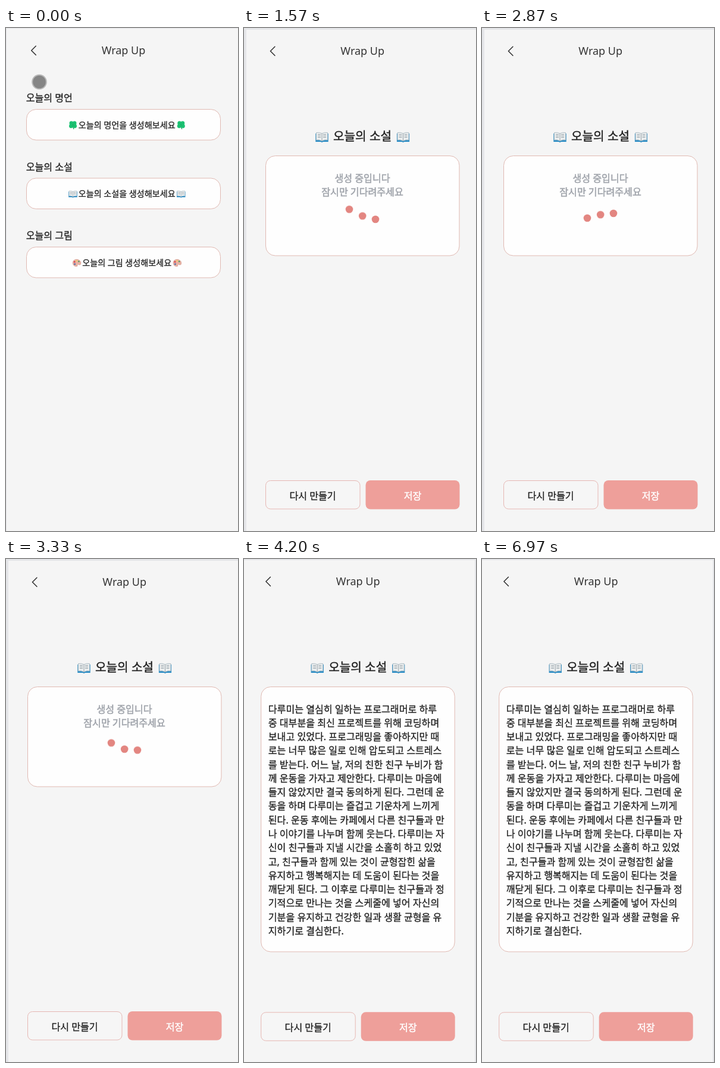
Write an HTML page that moves like this. It is 390x844 px and loops after 7010 ms.

```html
<!DOCTYPE html>
<html lang="ko">
<head>
<meta charset="utf-8">
<title>Wrap Up</title>
<style>
html, body { margin: 0; width: 100%; height: 100%; overflow: hidden; background: #f5f5f5; }
svg { display: block; }
text { font-family: "Noto Sans", "Noto Sans CJK KR", "Noto Sans CJK", sans-serif; font-size: 16.1px; fill: #222; stroke: #222; stroke-width: .3px; white-space: pre; }
.title { font-size: 18px; fill: #333; stroke: none; }
.head { font-size: 20.2px; stroke-width: .45px; }
.cta { font-size: 14.1px; }
.mid { text-anchor: middle; }
.wait { fill: #a2a6ad; stroke: #a2a6ad; stroke-width: .6px; }
.white { fill: #fff; stroke: #fff; stroke-width: .5px; }
.card { fill: #fefefe; stroke: #e0b9b2; }
.ghost { fill: #f6f6f6; stroke: #e6b7b3; }
.solid { fill: #ee9f9a; }
.back { fill: none; stroke: #333; stroke-width: 1.6; stroke-linecap: round; stroke-linejoin: round; }
.dot { fill: #e38681; }
</style>
</head>
<body>
<svg id="stage" width="390" height="844" viewBox="0 0 390 844">
  <defs>
    <symbol id="book" viewBox="0 0 22 20">
      <path d="M.3 4H21.700V18H13L11 19L9 18H.3Z" fill="#2f8fc6"/>
      <path d="M1.500 2.500Q7 1.500 11 4Q15 1.500 20.500 2.500V15Q15 14 11 16.500Q7 14 1.500 15Z" fill="#eceff0" stroke="#a3b3bc" stroke-width=".8"/>
      <path d="M11 4V16.500M4 5.500H9M4 8H9M4 10.500H9M13 5.500H18M13 8H18M13 10.500H18" stroke="#98a3a9" stroke-width="1"/>
    </symbol>
    <symbol id="clover" viewBox="0 0 20 20">
      <path d="M10 10Q10 16 12 19" stroke="#129a55" stroke-width="1.800" fill="none"/>
      <g fill="#1cc273">
        <circle cx="6.500" cy="5.500" r="4.500"/><circle cx="13.500" cy="5.500" r="4.500"/>
        <circle cx="5.800" cy="12" r="4.500"/><circle cx="14.200" cy="12" r="4.500"/>
      </g>
      <path d="M6 5L14 13M14 5L6 13" stroke="#12a65d" stroke-width="1"/>
    </symbol>
    <symbol id="palette" viewBox="0 0 20 20">
      <path d="M1 10C1 4 8 1 13 3C19 5 21 11 18 14C15 16 13 12 11.500 14C10.500 16 13 18 9 18C4 18 1 14.500 1 10Z" fill="#e9b3a4" stroke="#c98f83" stroke-width=".8"/>
      <circle cx="5" cy="8" r="1.900" fill="#d8434f"/><circle cx="9.500" cy="5.500" r="1.800" fill="#f0d069"/>
      <circle cx="14.500" cy="7" r="1.800" fill="#549b66"/><circle cx="5.500" cy="13" r="1.900" fill="#5b6fa8"/>
    </symbol>
  </defs>
</svg>
<script>
const LOOP = 7010, LOADING_AT = 1030, STORY_AT = 4030;
const BOUNCE = 355.5, LAG = BOUNCE * 0.07 / 0.6;
const stage = document.getElementById('stage');

function add(parent, tag, attrs, content) {
  const el = document.createElementNS('http://www.w3.org/2000/svg', tag);
  for (const key in attrs) el.setAttribute(key, attrs[key]);
  if (content) el.textContent = content;
  parent.append(el);
  return el;
}
const box = (g, cls, x, y, width, height, rx) =>
  add(g, 'rect', { class: cls, x, y, width, height, rx });
const label = (g, cls, x, y, str) => add(g, 'text', { class: cls, x, y }, str);
const icon = (g, name, x, y, width, height) =>
  add(g, 'use', { href: '#' + name, x, y, width, height });

// The page sheet at (x, y), its title and back arrow
function screen(x, y, right, titleX, titleY) {
  const g = add(stage, 'g', {});
  add(g, 'rect', { width: 390, height: 844, fill: '#e5e6e9' });
  add(g, 'rect', { x, y, width: right - x, height: 844 - y, fill: '#f5f5f5' });
  label(g, 'title mid', titleX, titleY, 'Wrap Up');
  add(g, 'path', { class: 'back', d: `M${titleX - 147.3} ${titleY - 13.7}l-7.500 7.500 7.500 7.500` });
  return g;
}

function novel(g, x, cardHeight, btnY) {
  icon(g, 'book', x + 83.5, 173, 22, 20);
  label(g, 'head mid', x + 162.5, 188.7, '오늘의 소설');
  icon(g, 'book', x + 220, 173, 22, 20);
  box(g, 'card', x, 214.5, 325.5, cardHeight, 16);
  box(g, 'ghost', x, btnY, 158.5, 47.5, 8);
  box(g, 'solid', x + 168, btnY - 0.5, 158, 48.5, 8);
  label(g, 'mid', x + 79, btnY + 31.2, '다시 만들기');
  label(g, 'mid white', x + 247, btnY + 31.2, '저장');
}

const home = screen(1, 1, 390, 197.5, 44);
[
  ['명언', '명언을', 'clover', 105],
  ['소설', '소설을', 'book', 105],
  ['그림', '그림', 'palette', 111.5]
].forEach(([name, object, art, x], i) => {
  const y = i * 115.5;
  label(home, '', 33.7, 123 + y, '오늘의 ' + name);
  box(home, 'card', 34.5, 136.5 + y, 326, 51.5, 16);
  label(home, 'cta mid', 203.2, 167.9 + y, `오늘의 ${object} 생성해보세요`);
  icon(home, art, x, 155.5 + y, 15, 15);
  icon(home, art, 391.8 - x, 155.5 + y, 15, 15);
});
const cursor = add(home, 'g', {});
add(cursor, 'circle', { r: 12.8, fill: '#b9b9b9' });
add(cursor, 'circle', { r: 10.8, fill: '#858585' });

const loading = screen(4, 3, 390, 199.2, 45);
novel(loading, 36.5, 167.5, 759.5);
label(loading, 'wait mid', 199, 257.6, '생성 중입니다');
label(loading, 'wait mid', 199, 280.9, '잠시만 기다려주세요');
const bounces = [177, 199.2, 221].map(cx => {
  const dot = add(loading, 'circle', { class: 'dot', cx, cy: 311, r: 6.3 });
  const anim = dot.animate([
    { transform: 'translateY(0)', easing: 'ease-in-out' },
    { transform: 'translateY(10px)', offset: 0.33, easing: 'ease-in-out' },
    { transform: 'translateY(-10px)', offset: 0.66, easing: 'ease-in-out' },
    { transform: 'translateY(0)' }
  ], { duration: BOUNCE, iterations: Infinity });
  anim.pause();
  return anim;
});

const story = screen(0, 2, 388, 191.7, 44);
novel(story, 28.7, 444.5, 760.8);
`다루미는 열심히 일하는 프로그래머로 하루
중 대부분을 최신 프로젝트를 위해 코딩하며
보내고 있었다. 프로그래밍을 좋아하지만 때
로는 너무 많은 일로 인해 압도되고 스트레스
를 받는다. 어느 날, 저의 친한 친구 누비가 함
께 운동을 가자고 제안한다. 다루미는 마음에
들지 않았지만 결국 동의하게 된다. 그런데 운
동을 하며 다루미는 즐겁고 기운차게 느끼게
된다. 운동 후에는 카페에서 다른 친구들과 만
나 이야기를 나누며 함께 웃는다. 다루미는 자
신이 친구들과 지낼 시간을 소홀히 하고 있었
고, 친구들과 함께 있는 것이 균형잡힌 삶을
유지하고 행복해지는 데 도움이 된다는 것을
깨닫게 된다. 그 이후로 다루미는 친구들과 정
기적으로 만나는 것을 스케줄에 넣어 자신의
기분을 유지하고 건강한 일과 생활 균형을 유
지하기로 결심한다.`.split('\n').forEach((line, i) =>
  label(story, '', 40.8, 257.5 + i * 23.28, line));

const show = (el, on) => { el.style.display = on ? '' : 'none'; };

function draw(t) {
  show(home, t < LOADING_AT);
  show(loading, t >= LOADING_AT && t < STORY_AT);
  show(story, t >= STORY_AT);
  const u = Math.min(t / 780, 1);
  const k = u * u * (3 - 2 * u);
  cursor.setAttribute('transform', `translate(${56 + 134 * k} ${90.5 + 187 * k})`);
  bounces.forEach((anim, i) => { anim.currentTime = t + BOUNCE + 54 - i * LAG; });
}

let start;
function tick(now) {
  start ??= now;
  draw((now - start) % LOOP);
  requestAnimationFrame(tick);
}
draw(0);
requestAnimationFrame(tick);
</script>
</body>
</html>
```
